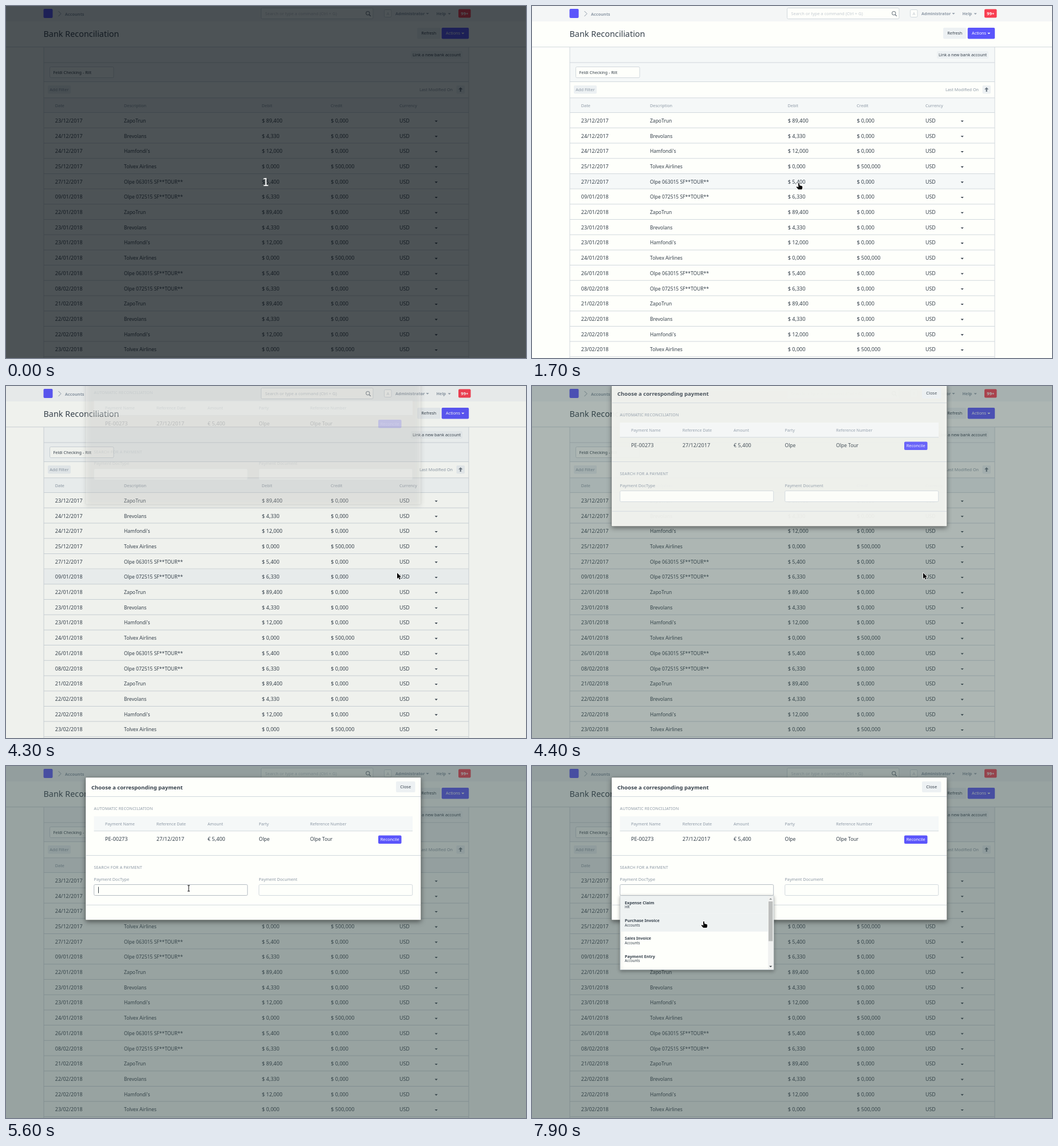
These frames come from a looping animation (908x616 px, 8 s). An HTML page with a canvas:

```html
<!DOCTYPE html>
<html lang="en">
<head>
<meta charset="utf-8">
<title>Bank Reconciliation</title>
<style>
  html, body { margin: 0; width: 100%; height: 100%; overflow: hidden; background: #fefffb; }
  canvas { display: block; width: 908px; height: 616px; }
</style>
</head>
<body>
<canvas id="stage" width="908" height="616"></canvas>
<script>
const ctx = document.getElementById('stage').getContext('2d');
const W = 908, H = 616, LOOP = 8000, STEP = 100;
const SANS = '"Noto Sans", "Open Sans", sans-serif';
const PAPER = '#fefffb', PALE = '#f5f8f8', CHIP = '#edf1f3', LINE = '#d1d8dd';
const INK = '#36414c', MUTED = '#8d99a6', PRIMARY = '#5b55fb', RED = '#f83e51';
const ROW_TOP = 186.6, ROW_H = 26.7;

const payees = [
  ['ZapoTrun', '89,400'], ['Brevolans', '4,330'], ["Hamfondi's", '12,000'],
  ['Tolvex Airlines', '0,000', '500,000'],
  ['Olpe 063015 SF**TOUR**', '5,400'], ['Olpe 072515 SF**TOUR**', '6,330']
];
const dates = ('23/12/2017 24/12/2017 24/12/2017 25/12/2017 27/12/2017 09/01/2018 ' +
  '22/01/2018 23/01/2018 23/01/2018 24/01/2018 26/01/2018 08/02/2018 ' +
  '21/02/2018 22/02/2018 22/02/2018 23/02/2018').split(' ');
const docTypes = [['Expense Claim', 'HR'], ['Purchase Invoice', 'Accounts'],
  ['Sales Invoice', 'Accounts'], ['Payment Entry', 'Accounts']];

// Pointer stops: time, shape, tip x, tip y
const pointer = [
  [0, ''], [700, 'hand', 800, 307], [900, 'hand', 799, 307],
  [1100, 'hand', 560, 316], [1200, 'hand', 345, 322], [1400, 'hand', 304, 315],
  [1600, 'hand', 340, 313], [1700, 'hand', 466, 310], [1800, 'hand', 640, 310],
  [1900, 'hand', 738, 310], [2100, 'hand', 744, 310], [2200, 'hand', 748, 309],
  [2500, 'hand', 749, 309], [3000, 'hand', 750, 308], [3200, 'hand', 712, 318],
  [3300, 'hand', 684, 327], [4000, 'arrow', 683, 327], [4700, 'arrow', 681, 327],
  [4800, 'arrow', 630, 300], [4900, 'arrow', 567, 273], [5200, 'arrow', 520, 262],
  [5300, 'arrow', 440, 236], [5400, 'beam', 370, 220], [5500, 'beam', 330, 215],
  [5600, 'beam', 319, 214], [7400, 'beam', 319, 213], [7700, 'hand', 317, 236],
  [7800, 'hand', 305, 262], [7900, 'hand', 300, 272]
];
// Dialog stops: time, backdrop, opacity, vertical shift
const dialog = [[0, 0, 0, 0], [4200, .02, 0, 0], [4300, .075, .22, -62.5],
  [4400, .4, .9, -24], [4500, .5, 1, 0]];

const at = (keys, t) => keys.filter(k => k[0] <= t).pop();

function text(s, x, y, size = 7.3, color = INK, weight = 400, align = 'left') {
  ctx.font = `${weight} ${size}px ${SANS}`;
  ctx.fillStyle = color;
  ctx.textAlign = align;
  ctx.fillText(s, x, y);
}

function box(x, y, w, h, fill, stroke, r = 0) {
  ctx.beginPath();
  ctx.roundRect(x, y, w, h, r);
  if (fill) { ctx.fillStyle = fill; ctx.fill(); }
  if (stroke) { ctx.strokeStyle = stroke; ctx.lineWidth = 1; ctx.stroke(); }
}

function shape(points, fill, stroke, width = 1, close = true) {
  ctx.beginPath();
  points.forEach(([x, y]) => ctx.lineTo(x, y));
  if (close) ctx.closePath();
  if (stroke) { ctx.strokeStyle = stroke; ctx.lineWidth = width; ctx.stroke(); }
  if (fill) { ctx.fillStyle = fill; ctx.fill(); }
}

const hline = (x, y, w, color = LINE) => box(x, y - .5, w, 1, color);
const caret = (x, y, color = INK, s = 2.6) =>
  shape([[x - s, y - s / 2], [x + s, y - s / 2], [x, y + s / 2]], color);

function shadowed(blur, dy, color, draw) {
  ctx.save();
  ctx.shadowBlur = blur;
  ctx.shadowOffsetY = dy;
  ctx.shadowColor = color;
  draw();
  ctx.restore();
}

function navbar() {
  box(0, 0, W, 27, '#f4f6f6');
  box(65.5, 5, 16, 16, PRIMARY, null, 2);
  shape([[91.5, 9], [96, 13.5], [91.5, 18]], null, MUTED, 1, false);
  text('Accounts', 103, 16.5, 7.3, MUTED, 600);

  box(445.5, 3.5, 195.5, 19, PAPER, LINE, 2);
  text('Search or type a command (Ctrl + G)', 452.5, 16, 7.4, '#c3cad1');
  ctx.beginPath();
  ctx.arc(631.8, 12.6, 3.1, 0, 7);
  ctx.strokeStyle = '#737d87';
  ctx.lineWidth = 1.1;
  ctx.stroke();
  shape([[634, 15], [636.8, 17.8]], null, '#737d87', 1.4, false);

  box(660.5, 6.5, 12.5, 13, PAPER, LINE, 2);
  text('A', 666.8, 16, 7.5, '#c3cad1', 400, 'center');
  text('Administrator', 680, 16, 7.3, MUTED, 600);
  caret(736, 13.5, MUTED);
  text('Help', 751.5, 16, 7.3, MUTED, 600);
  caret(774.2, 13.8, MUTED);
  box(790, 5.5, 21.5, 15, RED, null, 2);
  text('99+', 800.8, 16, 7.6, '#fff', 600, 'center');
}

function toolbar() {
  text('Bank Reconciliation', 65.5, 54, 14.4, INK);
  box(718, 38, 40.5, 19.5, CHIP, null, 2);
  text('Refresh', 738.3, 50.3, 7.3, INK, 400, 'center');
  box(760.7, 38, 47.5, 19.5, PRIMARY, null, 2);
  text('Actions', 768, 50.3, 7.3, '#fff');
  caret(797.8, 48, '#fff');

  box(66, 72, 742, 60, PALE);
  box(66, 161, 742, 25.5, PALE);
  hline(0, 71.8, W);
  [99, 132.5, 160.7].forEach(y => hline(66, y, 742));

  box(707, 79, 90, 13, CHIP, null, 2);
  text('Link a new bank account', 710, 88);
  box(76.5, 106.5, 111.5, 19, PAPER, LINE, 2);
  text('Feldi Checking - Rilt', 82.5, 118.7);
  box(73, 139, 40, 14.5, CHIP, null, 2);
  text('Add Filter', 76.2, 149, 7.4, MUTED);
  text('Last Modified On', 722, 148.5, 7.25, MUTED);
  box(786.5, 139, 14.5, 14.5, CHIP, null, 2);
  shape([[793.7, 142.3], [797.3, 146], [794.8, 146], [794.8, 150],
    [792.6, 150], [792.6, 146], [790.1, 146]], '#6f7a85');

  [['Date', 85.8], ['Description', 206], ['Debit', 446.5], ['Credit', 567], ['Currency', 687]]
    .forEach(([s, x]) => text(s, x, 176.5, 7.25, MUTED));
}

function table(hover) {
  hline(66, ROW_TOP, 742);
  dates.forEach((date, i) => {
    const top = ROW_TOP + ROW_H * i, base = top + 17.2;
    const [name, debit, credit = '0,000'] = payees[i % payees.length];
    if (i === hover) box(66, top + .5, 742, ROW_H - 1, PALE);
    hline(66, top + ROW_H, 742);
    text(date, 85.8, base, 9);
    text(name, 206, base, 8.5);
    text('$ ' + debit, 446.7, base, 9.1);
    text('$ ' + credit, 567.2, base, 9.1);
    text('USD', 687, base, 8.9);
    caret(751.2, base - 2, INK);
  });
  box(65.5, 72, 1, H - 72, LINE);
  box(807.5, 72, 1, H - 72, LINE);
}

function rowMenu(active) {
  shadowed(6, 3, 'rgba(0,0,0,.18)', () => box(627.5, 317.5, 123, 87, PAPER, LINE, 2));
  if (active) box(628, 319, 122, 19, '#f0f4f7');
  hline(628, 341, 122);
  ['Reconcile', 'New Payment', 'New Invoice', 'New Expense']
    .forEach((s, i) => text(s, 644, 331.5 + i * 20 + (i ? 3 : 0)));
}

function label(s, y) {
  ctx.letterSpacing = '0.17px';
  text(s, 153.5, y, 7, MUTED);
  ctx.letterSpacing = '0px';
}

function modal(alpha, dy, focused, blink) {
  ctx.save();
  ctx.globalAlpha = alpha;
  ctx.translate(0, dy);
  shadowed(9, 3, 'rgba(0,0,0,.5)', () => box(139, 20, 585.5, 249.5, PAPER, null, 1));
  box(139, 20, 585.5, 249.5, null, 'rgba(0,0,0,.2)', 1);
  text('Choose a corresponding payment', 149, 40.5, 9.55, INK, 700);
  box(681, 27, 33.5, 19, CHIP, null, 2);
  text('Close', 697.7, 39, 7.4, INK, 400, 'center');
  [53.5, 156.5, 243.2].forEach(y => hline(139.5, y, 584.5));

  label('AUTOMATIC RECONCILIATION', 76.8);
  box(153.5, 88, 556.5, 25.5, PALE);
  hline(153.5, 113.7, 556.5);
  [['Payment Name', 'PE-00273', 173], ['Reference Date', '27/12/2017', 262.8],
    ['Amount', '€ 5,400', 352], ['Party', 'Olpe', 441.5],
    ['Reference Number', 'Olpe Tour', 531]].forEach(([head, value, x], i) => {
    text(head, x, 103.5, 7.15, MUTED);
    text(value, x, 131, i < 3 ? 9.1 : 8.5);
  });
  box(650, 121.5, 40.5, 14.5, PRIMARY, null, 2);
  text('Reconcile', 670.2, 131.4, 7.4, '#fff', 400, 'center');

  label('SEARCH FOR A PAYMENT', 180.3);
  text('Payment DocType', 153.5, 200.5, 7.3, MUTED);
  text('Payment Document', 441.5, 200.5, 7.2, MUTED);
  box(153.7, 207.5, 268, 19, PAPER, focused ? '#b4bcc3' : LINE, 2);
  box(441.7, 207.5, 268, 19, PAPER, LINE, 2);
  if (blink) box(161, 211.5, 1, 11, INK);
  ctx.restore();
}

function suggestions(hover) {
  shadowed(6, 2, 'rgba(0,0,0,.3)', () => box(154, 227, 268, 129.5, PAPER, '#c3cbd0'));
  docTypes.forEach(([name, group], i) => {
    const y = 227.2 + i * 31.3;
    if (i === 0 || i === hover) box(154.5, y, 258, 31.3, '#eef2f2');
    text(name, 162, y + 14.6, 7.15, INK, 700);
    text(group, 162, y + 22.2, 6.2);
  });
  box(412.3, 227.5, 9.2, 128.5, '#f0f1f0');
  box(413, 237, 7.3, 69.5, '#bcbebd');
  shape([[414.2, 233.8], [419.2, 233.8], [416.7, 231.2]], '#8e9292');
  caret(416.7, 351, '#404548', 2.5);
}

function drawPointer(kind, x, y) {
  ctx.save();
  ctx.translate(x, y);
  ctx.lineJoin = 'round';
  if (kind === 'arrow') {
    shape([[0, 0], [0, 10.2], [2.3, 8.1], [4, 11.8], [5.6, 11], [4, 7.4], [7, 7.2]], '#000', '#fff', 1.6);
  } else if (kind === 'hand') {
    shape([[-1, 0], [.6, 0], [1.2, 4], [5.8, 5.2], [6.2, 8], [5.2, 11], [-1, 11],
      [-4.4, 7], [-3.4, 6], [-.8, 7.2]], '#000', '#fff', 1.6);
  } else if (kind === 'beam') {
    const lines = [[[-2, -5], [2, -5]], [[0, -5], [0, 5]], [[-2, 5], [2, 5]]];
    lines.forEach(p => shape(p, null, '#fff', 2.4, false));
    lines.forEach(p => shape(p, null, '#222', 1.1, false));
  }
  ctx.restore();
}

function countdown() {
  box(0, 0, W, H, 'rgba(4,10,17,.7)');
  ctx.font = '19px "DejaVu Sans", sans-serif';
  ctx.fillStyle = '#fff';
  ctx.textAlign = 'center';
  ctx.fillText('1', 453.6, 314.5);
}

function draw(t) {
  const [, kind, x, y] = at(pointer, t);
  const [, shade, alpha, dy] = at(dialog, t);
  const menuOpen = t >= 2700 && t < 4000;
  const onRows = kind && !menuOpen && t < 4400;

  box(0, 0, W, H, PAPER);
  navbar();
  toolbar();
  table(onRows ? Math.floor((y - ROW_TOP) / ROW_H) : -1);
  if (menuOpen) rowMenu(t >= 3300);
  if (shade) box(0, 0, W, H, `rgba(52,73,72,${shade})`);
  if (alpha) {
    const focused = t >= 5600;
    modal(alpha, dy, focused, focused && Math.floor((t - 5600) / 600) % 2 === 0);
  }
  if (t >= 6900) suggestions(Math.floor((y - 227) / 31.3));
  drawPointer(kind, x, y);
  if (t < 400) countdown();
}

const start = performance.now();
function tick() {
  const t = (performance.now() - start) % LOOP;
  draw(Math.floor(t / STEP) * STEP);
  requestAnimationFrame(tick);
}
tick();
</script>
</body>
</html>
```
